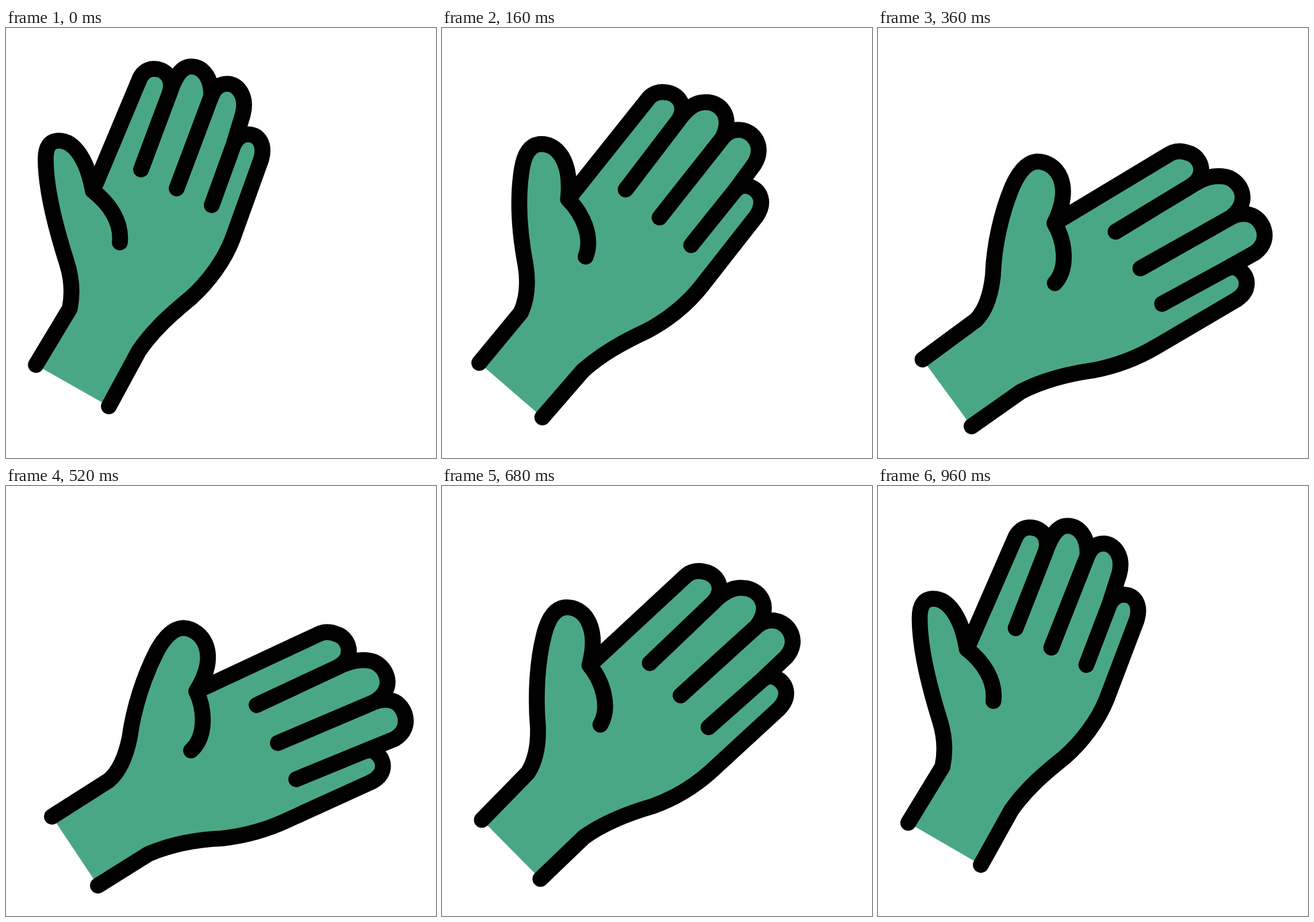
Write an HTML page that moves like this. It is 748 by 748 pixels and loops after 1 s.

```html
<!DOCTYPE html>
<html lang="en">
<head>
<meta charset="utf-8">
<title>Waving hand</title>
<style>
  html, body { margin: 0; width: 100%; height: 100%; overflow: hidden; background: #fff; }
  svg { display: block; width: 100%; height: 100%; }
  path { fill: #4aa785; stroke: #000; stroke-width: 27.7; stroke-linecap: round; stroke-linejoin: round; }
</style>
</head>
<body>
<svg viewBox="0 0 748 748"><path id="hand"/></svg>
<script>
// Both poses share the same commands: outline, three finger grooves, palm crease.
const raised = `M52 586 L111 488 C116 462 114 434 106 409 C84 340 69 278 69 228
  C69 207 76 196 92 196 C120 196 142 232 151 283
  L231 92 C236 78 246 71 257 71 C277 71 294 88 284 115
  C295 82 306 67 322 67 C342 67 358 86 357 119
  C363 104 372 97 385 97 C403 97 420 118 412 150
  L396 203 C402 190 412 185 422 185 C440 186 451 202 444 228
  L394 367 C380 404 352 442 322 469 C287 498 257 524 231 562 L179 658
  M284 115 L235 246 M357 119 L297 279 M396 203 L358 308
  M151 283 C178 304 202 336 198 373`;
const lowered = `M80 575 L179 512 C199 495 209 467 215 438 C222 386 240 331 262 288
  C275 264 290 247 309 247 C342 249 373 292 331 357
  L543 258 C555 252 567 254 576 258 C596 264 609 298 577 315
  C600 303 618 301 633 304 C658 307 684 350 640 376
  C652 371 663 371 673 374 C693 380 710 420 676 440
  L622 462 C635 457 643 462 648 468 C659 480 661 502 635 515
  L490 581 C452 599 412 609 376 613 C331 615 288 623 248 640 L160 695
  M577 315 L436 381 M640 376 L473 447 M622 462 L505 510
  M331 357 C346 388 349 436 322 460`;

const LOOP = 1000, STEP = 40, PIVOT = [118, 628], ARM_REACH = 265;

// time, progress of the hand, progress of the forearm
const keys = [
  [0, 0, 0], [160, .385, .433], [360, .864, .914], [490, 1.01, 1.01], [520, 1, 1],
  [560, .935, .945], [680, .588, .58], [800, .253, .23], [960, .02, .02], [1000, 0, 0]
];

const polar = d => [...d.matchAll(/(\d+) (\d+)/g)].map(([, x, y]) => {
  const dx = x - PIVOT[0], dy = PIVOT[1] - y;
  return { r: Math.hypot(dx, dy), a: Math.atan2(dy, dx) };
});
const from = polar(raised), to = polar(lowered);
const mix = (a, b, k) => a + (b - a) * k;
const clamp = (v, lo, hi) => Math.max(lo, Math.min(hi, v));

// Slope at a key, flat at turning points
function slope(i, col) {
  const p = keys[i - 1], k = keys[i], n = keys[i + 1];
  if (!p || !n || (k[col] - p[col]) * (n[col] - k[col]) <= 0) return 0;
  return (n[col] - p[col]) / (n[0] - p[0]);
}

function progress(t, col) {
  const i = keys.findIndex(k => k[0] > t) - 1;
  const a = keys[i], b = keys[i + 1], span = b[0] - a[0], u = (t - a[0]) / span;
  return mix(a[col], b[col], u * u * (3 - 2 * u))
    + span * u * (1 - u) * ((1 - u) * slope(i, col) - u * slope(i + 1, col));
}

const hand = document.getElementById('hand');

function draw() {
  const t = Math.floor(performance.now() % LOOP / STEP) * STEP;
  const tip = progress(t, 1), arm = progress(t, 2);
  let i = 0;
  hand.setAttribute('d', raised.replace(/\d+ \d+/g, () => {
    const p = from[i], q = to[i++];
    const k = mix(arm, tip, Math.min(1, p.r / ARM_REACH)), bend = k * (1 - k);
    // The little finger's side leads, the thumb's side lags
    const a = mix(p.a, q.a, k + bend * clamp(.4 * (1.15 - p.a), -.2, .2));
    const r = mix(p.r, q.r, k + bend * .9);
    return (PIVOT[0] + r * Math.cos(a)).toFixed(2) + ' ' + (PIVOT[1] - r * Math.sin(a)).toFixed(2);
  }));
  requestAnimationFrame(draw);
}
draw();
</script>
</body>
</html>
```
